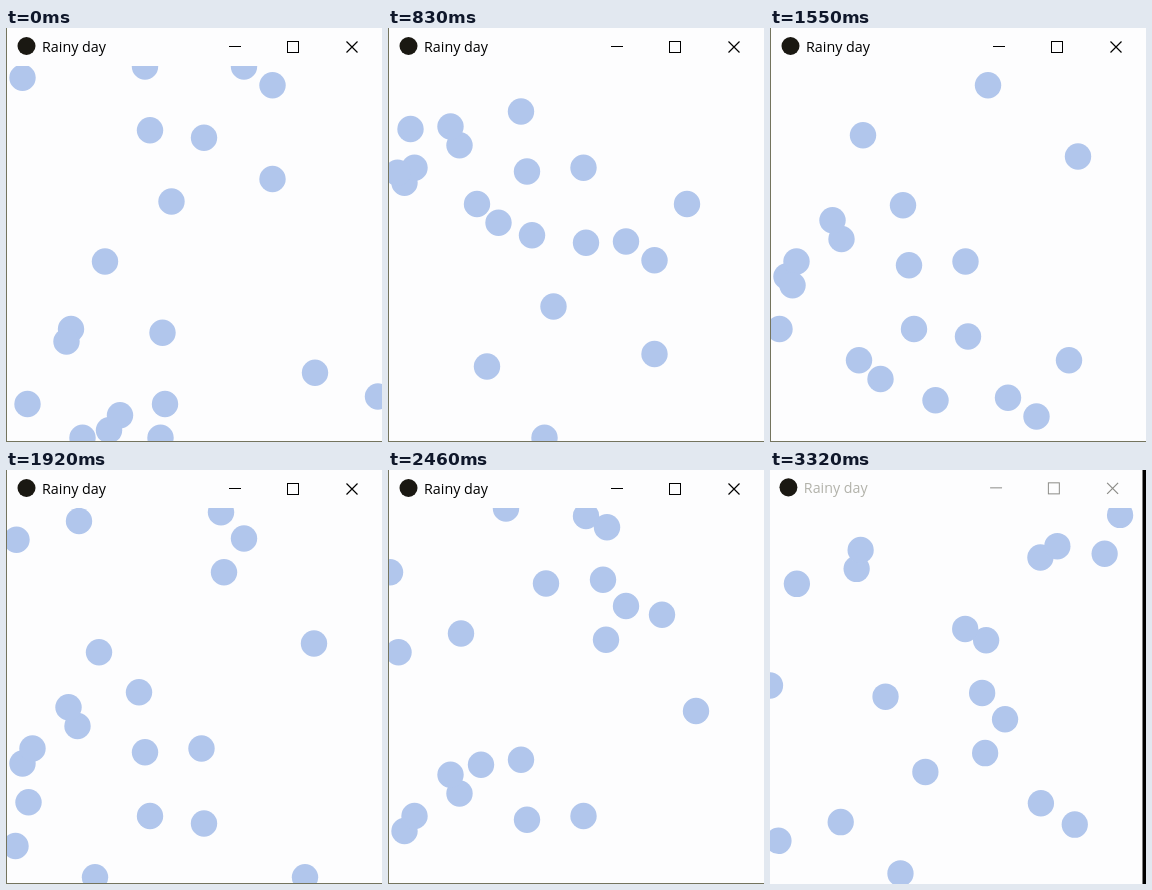
Animation of 376 by 414 pixels, one loop 3360 ms. Source, as an HTML page:

```html
<!DOCTYPE html>
<html lang="en">
<head>
<meta charset="utf-8">
<title>Rainy day</title>
<style>
  html, body { margin: 0; width: 100%; height: 100%; overflow: hidden; background: #000; }
  svg { display: block; width: 100vw; height: 100vh; }
  text { font: 14.3px "Open Sans", "Noto Sans", sans-serif; }
  #drops { fill: #b1c6ec; }
  #buttons { fill: none; stroke: #000; }
  #edge { fill: #74745e; }
  .closing text { fill: #b2b2aa; }
  .closing #buttons { stroke: #8c8c88; }
  .closing #edge { display: none; }
</style>
</head>
<body>
<svg id="stage" viewBox="0 0 376 414">
  <defs>
    <clipPath id="client"><rect y="38" width="376" height="376"/></clipPath>
  </defs>
  <g id="win">
    <rect width="376" height="416" fill="#fdfdfe"/>
    <g id="bar">
      <circle cx="20.5" cy="18" r="9" fill="#1a1812"/>
      <text x="36" y="24">Rainy day</text>
      <g id="buttons">
        <path d="M223 18.5h12" shape-rendering="crispEdges"/>
        <rect x="281.5" y="13.5" width="11" height="11" shape-rendering="crispEdges"/>
        <path d="M340.5 13.5l11 11m0-11l-11 11" stroke-width="1.2"/>
      </g>
    </g>
    <g clip-path="url(#client)"><g id="drops"></g></g>
  </g>
  <path id="edge" d="M0 0h1v413h375v1H0z" shape-rendering="crispEdges"/>
</svg>
<script>
const LOOP = 3360, CLOSE_AT = 3280, STEP_MS = 29.7;
const TOP = 38.5, DEPTH = 375, SLOW = 3.75, FAST = 6.25;

// Drops on screen at the start: x and steps already fallen. A negative x means a fast drop.
const falling = [
  [16.5, 3], [139, 0], [144, 17], [198, 19], [165.5, 36], [99, 52], [156.5, 71],
  [372, 88], [114, 93], [103, 97], [76.5, 99], [154.5, 99],
  [-238, 0], [-266.5, 3], [-266.5, 18], [-65, 42], [-60.5, 44], [-309, 49], [-21.5, 54], [-159, 54]
];
// Where each next drop enters; it does so when one leaves at the bottom.
const entries = [
  26.5, 195.5, -110.5, -89, -299, 71.5, -9.5, 62.5, 133, -22.5, 308, -93, 218, 238, -10.5,
  -73, 215, 2, -274, -158, 219, 198, -118, 89, 273.5, -29, 338, 93, -290.5, -353.5
];

const $ = id => document.getElementById(id);

function makeDrop(x, start) {
  const el = document.createElementNS("http://www.w3.org/2000/svg", "circle");
  el.setAttribute("cx", Math.abs(x));
  el.setAttribute("r", 13.2);
  $("drops").append(el);
  const speed = x < 0 ? FAST : SLOW;
  return { el, start, speed, end: start + DEPTH / speed };
}

const drops = falling.map(([x, fallen]) => makeDrop(x, -fallen));
const active = [...drops];
for (const x of entries) {
  active.sort((a, b) => a.end - b.end);
  const next = makeDrop(x, active.shift().end);
  active.push(next);
  drops.push(next);
}

function draw(t) {
  const closing = t >= CLOSE_AT;
  const step = Math.round(0.4 + t / STEP_MS) + closing;
  for (const { el, start, end, speed } of drops) {
    el.style.display = step >= start && step < end ? "" : "none";
    el.setAttribute("cy", TOP + (step - start) * speed);
  }
  $("stage").setAttribute("class", closing ? "closing" : "");
  $("win").setAttribute("transform", closing ? "matrix(.996 0 0 1.003 -2 0)" : "");
  $("bar").setAttribute("transform", closing ? "translate(0 -.7)" : "");
}

const began = performance.now();
function loop() {
  draw((performance.now() - began) % LOOP);
  requestAnimationFrame(loop);
}
loop();
</script>
</body>
</html>
```
